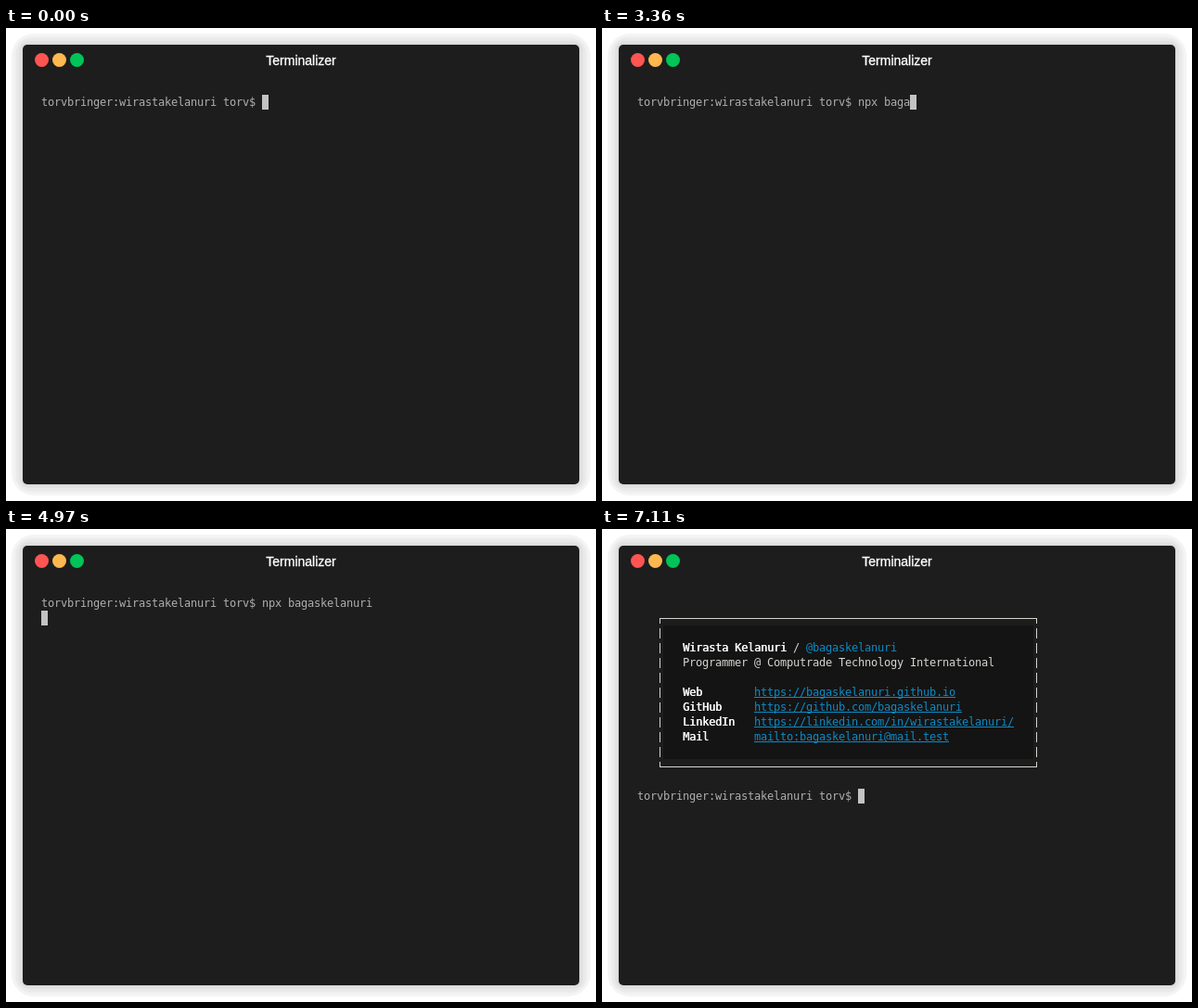
Recreate the animation shown at these times as an HTML page with a canvas. Size 636 by 510 pixels, loop 9110 ms.

```html
<!DOCTYPE html>
<html lang="en">
<head>
<meta charset="utf-8">
<title>Terminal</title>
<style>
  html, body { margin: 0; width: 100%; height: 100%; overflow: hidden; background: #fff; }
  canvas { display: block; width: 636px; height: 510px; }
</style>
</head>
<body>
<canvas id="stage"></canvas>
<script>
const W = 636, H = 510, LOOP = 9110;
const CELL = 7, ROW = 16, LEFT = 38, TOP = 72;
const MONO = '12px "DejaVu Sans Mono", monospace';
const FG = '#afafaf', WHITE = '#fbfbfb', LIGHT = '#d5d5d0', BLUE = '#0d8bc4', CURSOR = '#c3c3c3';

const PROMPT = 'torvbringer:wirastakelanuri torv$ ';
const COMMAND = 'npx bagaskelanuri';
const KEYS = [2000, 2190, 2290, 2450, 3030, 3110, 3180, 3360, 3440, 3560,
              3740, 3820, 4020, 4110, 4200, 4360, 4390];
const ENTER = 4970, CLEAR = 6990, CARD = 7010, DONE = 7110;
const LINKS = [
  ['Web', 'https://bagaskelanuri.github.io'],
  ['GitHub', 'https://github.com/bagaskelanuri'],
  ['LinkedIn', 'https://linkedin.com/in/wirastakelanuri/'],
  ['Mail', 'mailto:bagaskelanuri@mail.test']
];

const canvas = document.getElementById('stage');
const ctx = canvas.getContext('2d');
const dpr = window.devicePixelRatio || 1;
canvas.width = W * dpr;
canvas.height = H * dpr;
ctx.scale(dpr, dpr);

const colX = col => LEFT + col * CELL;
const rowY = row => TOP + row * ROW;

function rect(x, y, w, h, color) {
  ctx.fillStyle = color;
  ctx.fillRect(x, y, w, h);
}

function roundRect(grow, radius, color) {
  ctx.fillStyle = color;
  ctx.beginPath();
  ctx.roundRect(18 - grow, 18 - grow, 600 + 2 * grow, 474 + 2 * grow, radius);
  ctx.fill();
}

// Each character sits in its own terminal cell.
function write(text, col, row, color, bold) {
  ctx.font = MONO;
  ctx.textAlign = 'left';
  ctx.fillStyle = color;
  [...text].forEach((ch, i) => {
    const x = colX(col + i), y = rowY(row) + 12;
    ctx.fillText(ch, x, y);
    if (bold) ctx.fillText(ch, x + 0.5, y);
  });
}

function cursor(col, row) {
  rect(colX(col), rowY(row), CELL, ROW, CURSOR);
}

function drawWindow() {
  rect(0, 0, W, H, '#fff');
  roundRect(12, 24, '#f4f4f4');
  roundRect(9, 20, '#efefef');
  roundRect(7, 16, '#e8e9e8');
  roundRect(4, 11, '#e1e3e1');
  roundRect(2, 8, '#dbdddb');
  roundRect(0, 5, '#1d1d1d');
  ['#ff5552', '#ffb84f', '#00c457'].forEach((color, i) => {
    ctx.fillStyle = color;
    ctx.beginPath();
    ctx.arc(38.5 + 19 * i, 34.5, 7.5, 0, 2 * Math.PI);
    ctx.fill();
  });
  ctx.font = '14px "Liberation Sans", Arial, sans-serif';
  ctx.textAlign = 'center';
  ctx.fillStyle = ctx.strokeStyle = '#fff';
  ctx.lineWidth = 0.3;
  ctx.fillText('Terminalizer', 318, 40);
  ctx.strokeText('Terminalizer', 318, 40);
}

function drawCard() {
  const x1 = colX(3) + 3, x2 = colX(61) + 3;
  const y1 = rowY(1) + 8, y2 = rowY(11) + 8;
  rect(colX(4), rowY(2), 57 * CELL, 9 * ROW, '#141414');
  for (const y of [y1, y2]) rect(x1, y, x2 - x1 + 1, 1, LIGHT);
  for (const x of [x1, x2]) {
    rect(x, y1, 1, 6, LIGHT);
    rect(x, y2 - 5, 1, 6, LIGHT);
    for (let row = 2; row <= 10; row++) rect(x, rowY(row) + 3, 1, 11, LIGHT);
  }
  write('Wirasta Kelanuri', 7, 3, WHITE, true);
  write('/', 24, 3, LIGHT);
  write('@bagaskelanuri', 26, 3, BLUE);
  write('Programmer @ Computrade Technology International', 7, 4, LIGHT);
  LINKS.forEach(([label, url], i) => {
    write(label, 7, 6 + i, WHITE, true);
    write(url, 18, 6 + i, BLUE);
    rect(colX(18), rowY(6 + i) + 13, url.length * CELL, 1, BLUE);
  });
}

function draw(t) {
  drawWindow();
  if (t < CLEAR) {
    const typed = KEYS.filter(k => k <= t).length;
    write(PROMPT + COMMAND.slice(0, typed), 0, 0, FG);
    if (t < ENTER) cursor(PROMPT.length + typed, 0);
    else cursor(0, 1);
  } else if (t < CARD) {
    cursor(0, 1);
  } else {
    drawCard();
    if (t >= DONE) write(PROMPT, 0, 13, FG);
    cursor(t >= DONE ? PROMPT.length : 0, 13);
  }
}

const start = performance.now();
function tick() {
  draw((performance.now() - start) % LOOP);
  requestAnimationFrame(tick);
}
tick();
</script>
</body>
</html>
```
